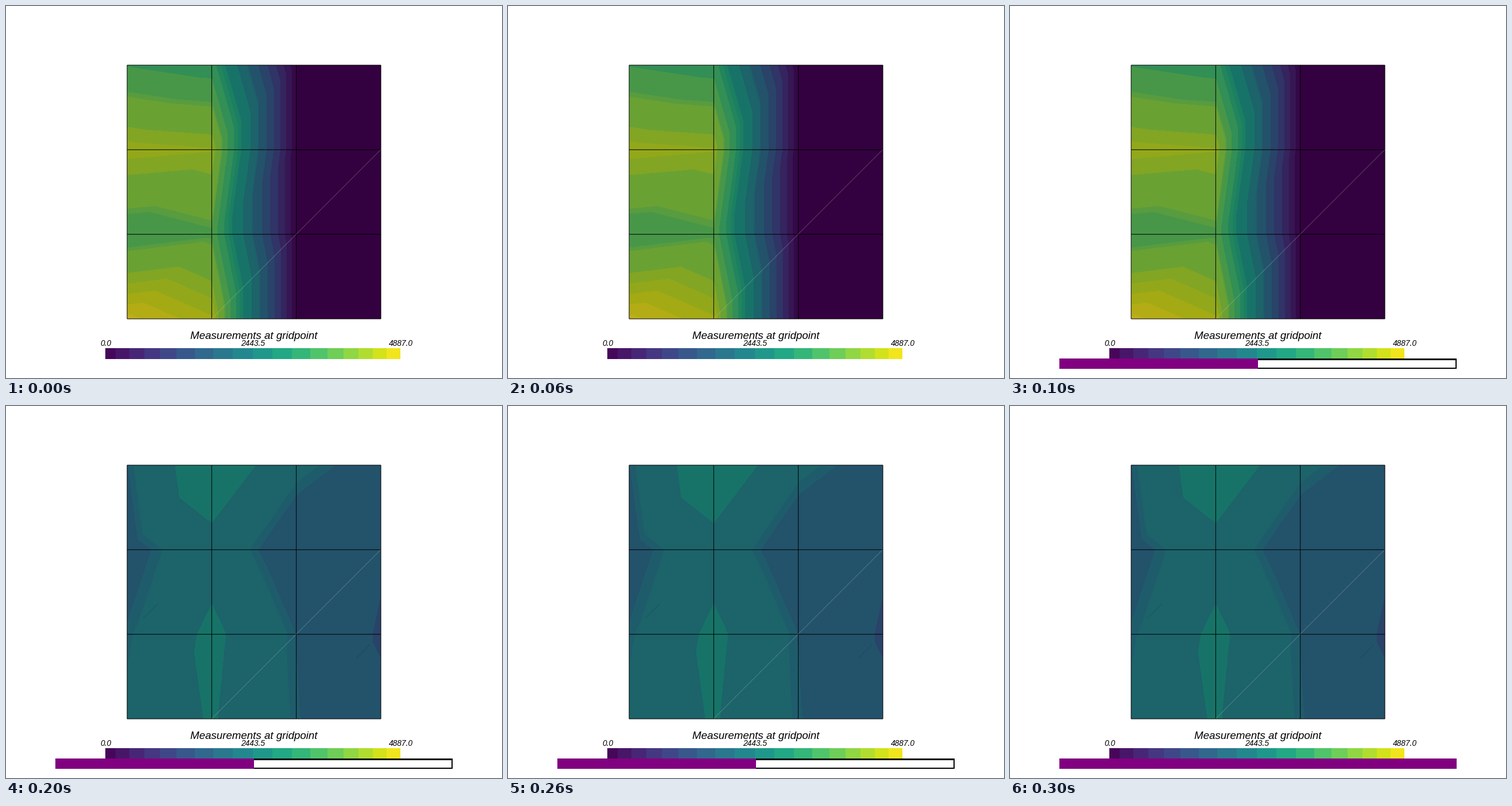
Write a matplotlib script that moves like this. It is 864x648 px and loops after 0.4 s.

```python
import numpy as np
import matplotlib.pyplot as plt
from matplotlib.animation import FuncAnimation
from matplotlib.patches import Rectangle
from matplotlib.tri import Triangulation

W, H, DPI = 864, 648, 100
PX = 72 / DPI
LEFT, TOP, SIDE = 211, 103, 442
STEPS, BANDS, PEAK = 4, 17, 1.025

# Grid point values, rows from top to bottom; the right half starts at zero
START = np.pad([[.744, .715], [.935, .920], [.763, .795], [PEAK, .955]],
               ((0, 0), (0, 2)))
END = np.array([[.409, .575, .437, .380],
                [.387, .470, .3625, .336],
                [.4145, .522, .410, .316],
                [.432, .511, .415, .348]])

cmap = plt.get_cmap("viridis")
fig = plt.figure(figsize=(W / DPI, H / DPI), dpi=DPI, facecolor="white")
ax = fig.add_axes([0, 0, 1, 1])
ax.set_xlim(0, W)
ax.set_ylim(H, 0)
ax.axis("off")


def box(x, y, w, h, color, z=2):
    return ax.add_patch(Rectangle((x, y), w, h, fc=color, lw=0, zorder=z,
                                  antialiased=False))


def line(xs, ys, color="black", alpha=1):
    return ax.plot(xs, ys, color=color, alpha=alpha, lw=PX, zorder=3,
                   snap=False, solid_capstyle="butt")[0]


def label(x, y, text, size):
    ax.text(x, y, text, fontsize=size * PX, family="Liberation Sans",
            style="italic", ha="center", va="baseline", zorder=5)


def band_levels():
    """Bands widen through the blues and narrow again towards yellow."""
    i = np.arange(9)
    low = .003 + .047 * i + .0035 * i ** 2
    mid = .68 + .068 * np.arange(4)
    high = mid[-1] + .0325 * np.arange(1, 5)
    thin = [.422, .64, .805]
    return np.sort(np.r_[-.01, low, mid, high, thin, PEAK + .02])


def mesh():
    xs, ys = np.meshgrid(LEFT + np.linspace(0, SIDE, 4),
                         TOP + np.linspace(0, SIDE, 4))
    tris = []
    for row in range(3):
        for col in range(3):
            a = 4 * row + col
            tris += [(a, a + 1, a + 4), (a + 1, a + 5, a + 4)]
    return Triangulation(xs.ravel(), ys.ravel(), tris)


grid = mesh()
levels = band_levels()
shades = cmap(np.clip((levels[:-1] + levels[1:]) / 2 / PEAK, 0, 1))
shades[:, :3] *= .75  # surface lighting

fields = [ax.tricontourf(grid, values.ravel(), levels=levels, colors=shades,
                         antialiased=False, zorder=1)
          for values in (START, END)]

# Cell edges and the light seam across the surface
for p in np.linspace(0, SIDE, 4):
    line([LEFT + p] * 2, [TOP, TOP + SIDE])
    line([LEFT, LEFT + SIDE], [TOP + p] * 2)
line([358.5, 652.5], [544.5, 250.5], "#c8c8c8", .3)
seams = [line([239, 264], [370, 345], alpha=.12),
         line([610, 634], [440, 416], alpha=.12)]

# Colour bar: one short band, then bands that are widest in the middle
u = np.linspace(0, 1, BANDS + 1)
turn = 2 * np.pi * u
edges = np.round(191 + 496 * u - 14 * np.sin(turn) + 4 * (1 - np.cos(turn)))
edges = np.r_[173, edges]
for x0, x1 in zip(edges, edges[1:]):
    box(x0, 596, x1 - x0, 19, cmap(((x0 + x1) / 2 - 173) / 514))

label(432, 580, "Measurements at gridpoint", 18.75)
for k in range(3):
    label(173.5 + 257 * k, 592, f"{2443.5 * k:.1f}", 13.8)

# Progress bar
bar = [box(86, 614, 692, 18, "black", 6),
       box(89, 617, 687, 13, "white", 7),
       box(86, 614, 0, 18, "purple", 8)]


def draw(i):
    late = i >= STEPS // 2
    fields[0].set_visible(not late)
    for part in [fields[1], *seams]:
        part.set_visible(late)
    done = (i + 1) // 2 / 2
    for part in bar:
        part.set_visible(done > 0)
    bar[-1].set_width(692 * done)
    return []


anim = FuncAnimation(fig, draw, frames=STEPS, interval=100, repeat=True,
                     init_func=lambda: draw(0), blit=False)
plt.show()
```
